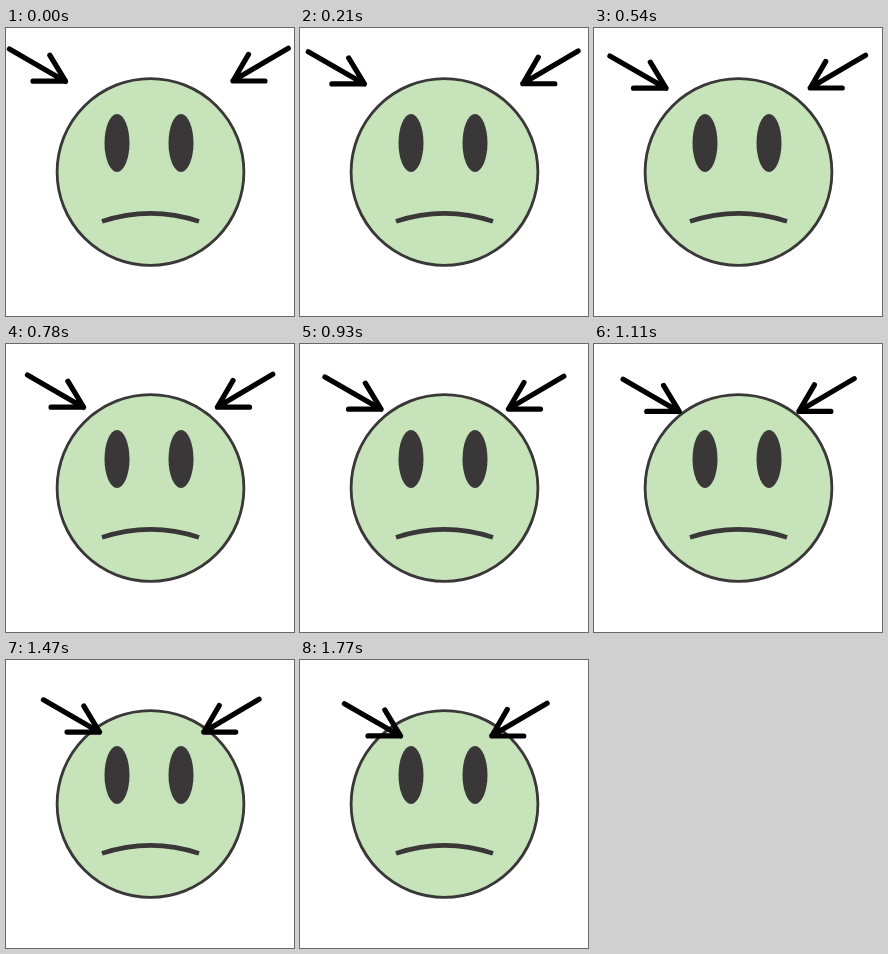
An HTML page for the animation above (1.8 s loop, 288 by 288 pixels).

```html
<!DOCTYPE html>
<html lang="en">
<head>
<meta charset="utf-8">
<title>Arrows and sad face</title>
<style>
  html, body { margin: 0; width: 100%; height: 100%; overflow: hidden; background: #fff; }
  svg { display: block; width: 100vw; height: 100vh; }
  .arrow { fill: none; stroke: #000; stroke-width: 5.2; stroke-linecap: round; stroke-linejoin: round; }
</style>
</head>
<body>
<svg viewBox="0 0 288 288">
  <circle cx="144.5" cy="144" r="93.4" fill="#c7e3ba" stroke="#393738" stroke-width="2.8"/>
  <g fill="#393738">
    <ellipse cx="111" cy="115" rx="12.5" ry="29"/>
    <ellipse cx="175" cy="115" rx="12.5" ry="29"/>
  </g>
  <path d="M96 193.4Q144.5 177.4 193 193.4" fill="none" stroke="#393738" stroke-width="4.6"/>
  <path id="left" class="arrow" d="M3.4 21L59.5 53.4M27 53.2H59.5L43.8 27.2"/>
  <path id="right" class="arrow" d="M282.3 20.2L227 52.8M259 53H227L242.5 26.4"/>
</svg>
<script>
  const LOOP = 1800, STEP = 30;
  const arrows = [
    { el: document.getElementById("left"), dx: 41, dy: 22.7 },
    { el: document.getElementById("right"), dx: -35.2, dy: 23 }
  ];
  const last = LOOP / STEP - 1;
  const start = performance.now();

  function draw(now) {
    const time = Math.max(0, now - start) % LOOP;
    const p = Math.floor(time / STEP) / last;
    for (const { el, dx, dy } of arrows) {
      el.setAttribute("transform", `translate(${dx * p} ${dy * p})`);
    }
    requestAnimationFrame(draw);
  }
  draw(start);
</script>
</body>
</html>
```
